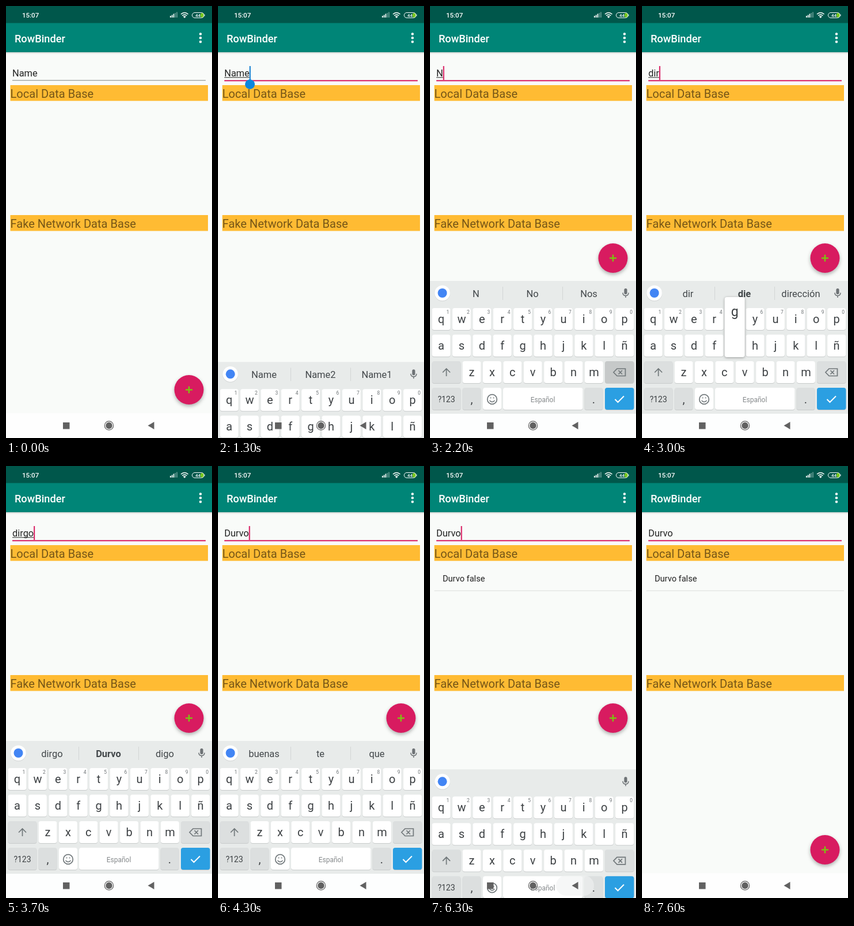
An HTML page that plays this animation: 358 by 748 pixels, repeating every 8000 ms.

```html
<!DOCTYPE html>
<html lang="en">
<head>
<meta charset="utf-8">
<title>Add a name</title>
<style>
html, body { margin: 0; width: 100%; height: 100%; overflow: hidden; background: #f9fbf9; }
svg { display: block; width: 358px; height: 748px; font-family: Roboto, sans-serif; }
.bar { fill: #ffbb33; }
.head { font-size: 20.1px; fill: #755617; }
.icon { fill: none; stroke: #70777a; stroke-width: 1.7; }
.key { fill: #fff; }
.fn { fill: #dcdfdf; }
.letter { font-size: 20px; fill: #3c4043; text-anchor: middle; }
.hint { font-size: 8.5px; fill: #6d7275; text-anchor: middle; }
.sug { font-size: 16.5px; fill: #42474a; text-anchor: middle; }
#fab { filter: drop-shadow(0 3px 3px rgba(0, 0, 0, .3)); }
#popup { filter: drop-shadow(0 1px 2px rgba(0, 0, 0, .35)); }
</style>
</head>
<body>
<svg viewBox="0 0 358 748">
  <rect width="358" height="748" fill="#f9fbf9"/>
  <rect y="80" width="358" height="3" fill="#000" opacity=".06"/>
  <rect y="80" width="358" height="1" fill="#000" opacity=".1"/>
  <rect y="29" width="358" height="51" fill="#008577"/>
  <rect width="358" height="29.5" fill="#00574b"/>

  <g fill="#fff">
    <text x="28" y="20" font-size="11.5" font-weight="500">15:07</text>
    <path d="M285 17h1.7v3H285zM287.8 15.500h1.700v4.500h-1.700zM290.600 13.500h1.700v6.500h-1.700z"/>
    <path d="M293.400 12h1.700v8h-1.700zM296.200 10.500h1.700v9.500h-1.700z" opacity=".4"/>
    <path d="M304 14.200q6.300-5.500 12.600 0M306.200 16.700q4.100-3.500 8.200 0" fill="none" stroke="#fff" stroke-width="1.500"/>
    <path d="M307.800 18.200q2.500-1.800 5 0l-2.500 2.800z"/>
    <rect x="338" y="12" width="6" height="8" rx="3" fill="#78c81e"/>
    <rect x="323.500" y="11.500" width="20.500" height="9" rx="4.500" fill="none" stroke="#fff"/>
    <path d="M345 14.500v3" stroke="#fff"/>
    <text x="333.500" y="19" font-size="8" font-weight="500" text-anchor="middle">44</text>
    <text x="15" y="62.500" font-size="18.2" font-weight="500">RowBinder</text>
    <circle cx="338" cy="48.500" r="2.200"/><circle cx="338" cy="55.300" r="2.200"/><circle cx="338" cy="62" r="2.200"/>
  </g>

  <rect class="bar" x="7.500" y="137" width="343.500" height="27.300"/>
  <text class="head" x="7.500" y="158.500">Local Data Base</text>
  <rect class="bar" x="7.500" y="362" width="343.500" height="27.500"/>
  <text class="head" x="7.500" y="383.700">Fake Network Data Base</text>

  <g id="item">
    <text x="22" y="199.500" font-size="14.6" fill="#222">Durvo false</text>
    <rect x="7.500" y="215.500" width="343.500" height="1" fill="#dcdedc"/>
  </g>

  <text id="name" x="11" y="122.300" font-size="16.4" fill="#222"></text>
  <rect id="compose" x="11" y="123.300" height="1" fill="#222"/>
  <rect id="line" x="11" width="336"/>
  <rect id="cursor" y="104" width="2" height="24"/>
  <path id="handle" d="M55.500 126.500l6 3a8.500 8.500 0 1 1-12 0z" fill="#0b86e0"/>

  <rect y="705" width="358" height="43" fill="#fefefe"/>
  <g id="fab">
    <circle r="25.500" fill="#d81b60"/>
    <path d="M-6 0H6M0-6V6" stroke="#7fbf12" stroke-width="2.600"/>
    <circle id="ripple" fill="#fff"/>
  </g>

  <g id="board">
    <rect y="476" width="358" height="230" fill="#e8ebea"/>
    <rect y="706" width="358" height="44" fill="#fdfefe"/>
    <circle cx="21.500" cy="497.800" r="13.500" fill="#d2d5d5"/>
    <circle cx="21.500" cy="497" r="13.300" fill="#fff"/>
    <circle cx="21.500" cy="497" r="8" fill="#4285f4"/>
    <g fill="#6d7275">
      <rect x="337.400" y="489" width="5.200" height="10" rx="2.600"/>
      <path d="M335 496.500q0 5 5 5t5-5M340 501v4" fill="none" stroke="#6d7275" stroke-width="1.500"/>
    </g>
    <g id="sugs">
      <path d="M126.500 486v23M230.500 486v23" stroke="#d2d5d5"/>
      <text class="sug" x="80" y="503.500"></text>
      <text class="sug" x="178" y="503.500"></text>
      <text class="sug" x="276" y="503.500"></text>
    </g>
    <g id="keys"></g>
    <path class="icon" d="M28.500 641v-13M22 634.500l6.500-6.500 6.500 6.500"/>
    <path class="icon" d="M325 628h14.500v12.500H325l-6-6.250zM327.500 631l6.500 6.500M334 631l-6.500 6.500" stroke-width="1.500"/>
    <g class="icon"><circle cx="108" cy="681" r="8.300"/><path d="M103.500 683q4.500 5 9 0M104.500 678.500h2M109.500 678.500h2"/></g>
    <path d="M321.500 681l5 5 10.500-10.500" fill="none" stroke="#fff" stroke-width="2"/>
    <g id="popup">
      <rect class="key" x="-17.500" y="-65" width="35" height="104" rx="4"/>
      <text class="letter" y="-32" style="font-size:23px"></text>
    </g>
  </g>

  <rect id="back" x="219" y="709" width="66" height="35" rx="17.500" fill="#f0f2f2"/>
  <g fill="#616161">
    <rect x="99" y="721" width="11.500" height="11.500"/>
    <circle cx="179" cy="726.500" r="5.700"/>
    <circle cx="179" cy="726.500" r="7.700" fill="none" stroke="#616161" stroke-width="1.200"/>
    <path d="M246.500 726.500l11-6.500v13z"/>
  </g>
</svg>
<script>
const LOOP = 8000, PITCH = 35.4, BOARD = 272;
const $ = id => document.getElementById(id);
const keyPos = {};

function add(tag, attrs, text) {
  const node = document.createElementNS('http://www.w3.org/2000/svg', tag);
  for (const k in attrs) node.setAttribute(k, attrs[k]);
  if (text) node.textContent = text;
  return $('keys').appendChild(node);
}

function key(x, y, w, cls = 'key') {
  add('rect', { x, y: y + 1, width: w, height: 38, rx: 4, fill: '#c8cbcb' });
  return add('rect', { x, y, width: w, height: 38, rx: 4, class: cls });
}

function letters(row, x0, y) {
  [...row].forEach((ch, i) => {
    const x = x0 + i * PITCH;
    keyPos[ch] = [x, y];
    key(x - 16, y, 32);
    add('text', { x, y: y + 25.5, class: 'letter' }, ch);
  });
}

letters('qwertyuiop', 19.5, 523);
letters('asdfghjklñ', 19.5, 569);
letters('zxcvbnm', 72.5, 615);
for (let i = 0; i < 10; i++)
  add('text', { x: 31 + i * PITCH, y: 533, class: 'hint' }, String((i + 1) % 10));
key(3.5, 615, 50, 'fn');
const erase = key(304, 615, 50.5, 'fn');
key(3.5, 661, 50, 'fn');
key(56.5, 661, 32, 'fn');
key(92, 661, 32);
key(127, 661, 138.5);
key(268.5, 661, 32, 'fn');
key(304, 661, 50.5).style.fill = '#2b9fe2';
add('text', { x: 28.5, y: 686, class: 'letter', style: 'font-size:14px' }, '?123');
add('text', { x: 72.5, y: 688, class: 'letter' }, ',');
add('text', { x: 284.5, y: 688, class: 'letter' }, '.');
add('text', { x: 196, y: 685.5, class: 'letter', style: 'font-size:12px;fill:#85898b' }, 'Español');

// time, field text, being composed, suggestions, bold middle one
const steps = [
  [0, 'Name', 0, ''],
  [1100, 'Name', 1, 'Name Name2 Name1'],
  [1750, 'Nam', 1, 'Nam Name Names'],
  [2050, 'Na', 1, 'Na Nada Nacional'],
  [2150, 'N', 1, 'N No Nos'],
  [2280, '', 0, 'N No Nos'],
  [2500, 'd', 1, 'd de del'],
  [2700, 'di', 1, 'di día dice'],
  [2880, 'dir', 1, 'dir die dirección', 1],
  [3080, 'dirg', 1, 'dirg dirige dirigir', 1],
  [3300, 'dirgo', 1, 'dirgo Durvo digo', 1],
  [4150, 'Durvo', 0, 'buenas te que'],
  [6050, 'Durvo', 0, '']
];
const presses = [[2420, 'd'], [2620, 'i'], [2800, 'r'], [2960, 'g'], [3220, 'o']];
const blinkOff = [[0, 1100], [3800, 4150], [4900, 5400], [5800, 6100], [6600, 7000], [7500, LOOP]];
const sugs = [...$('sugs').querySelectorAll('text')];

const clamp = u => Math.max(0, Math.min(1, u));
const within = (t, a, b) => t >= a && t < b;
const show = (node, on) => { node.style.display = on ? '' : 'none'; };
const set = (node, attrs) => { for (const k in attrs) node.setAttribute(k, attrs[k]); };

function drop(t) {
  return t < 4000
    ? BOARD * (1 - clamp((t - 1230) / 300)) ** 2.45
    : BOARD * clamp((t - 6200) / 200) ** 2.5;
}

function draw(t) {
  const [, text, composing, words, bold] = steps.filter(s => s[0] <= t).pop();
  const name = $('name');
  name.textContent = text;
  const width = text ? name.getComputedTextLength() : 0;
  set($('compose'), { width: composing ? width : 0 });

  const focused = t >= 1100, handle = within(t, 1100, 1750);
  set($('line'), focused
    ? { y: 128.3, height: 2, fill: '#d81b60' }
    : { y: 128.3, height: 1, fill: '#7d807e' });
  set($('cursor'), { x: 11 + width, fill: handle ? '#0b7ad0' : '#d81b60' });
  show($('cursor'), !blinkOff.some(([a, b]) => within(t, a, b)));
  show($('handle'), handle);
  show($('item'), t >= 5000);

  const y = drop(t);
  show($('board'), y < BOARD);
  set($('board'), { transform: `translate(0 ${y})` });
  set($('fab'), { transform: `translate(318 ${within(t, 1530, 6400) ? 436.5 : 664.5})` });
  const u = clamp((t - 4750) / 400);
  set($('ripple'), { r: 25.5 * Math.sqrt(u), opacity: .25 * (1 - u) });

  show($('sugs'), words);
  words.split(' ').forEach((w, i) => {
    sugs[i].textContent = w;
    sugs[i].style.fontWeight = bold && i === 1 ? 700 : 400;
  });
  erase.style.fill = within(t, 1700, 2280) ? '#c6c9c9' : '';

  const press = presses.find(([at]) => within(t, at, at + 120));
  show($('popup'), press);
  if (press) {
    set($('popup'), { transform: `translate(${keyPos[press[1]]})` });
    $('popup').lastElementChild.textContent = press[1];
  }
  $('back').style.opacity = .6 * clamp((t - 6050) / 80) * clamp((6400 - t) / 90);
}

const start = performance.now();
function tick() {
  draw((performance.now() - start) % LOOP);
  requestAnimationFrame(tick);
}
tick();
</script>
</body>
</html>
```
